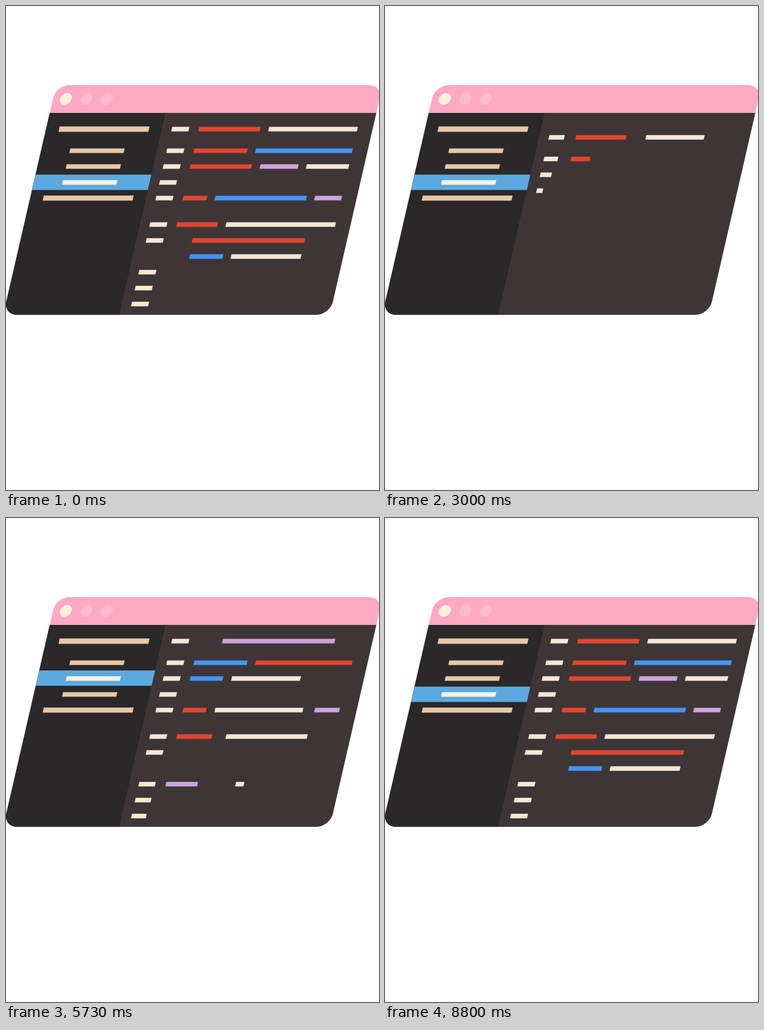
An HTML page with a canvas for the animation above (8870 ms loop, 658 by 851 pixels).

```html
<!DOCTYPE html>
<html lang="en">
<head>
<meta charset="utf-8">
<title>Code editor</title>
<style>
  html, body { margin: 0; width: 100%; height: 100%; overflow: hidden; background: #fff; }
  canvas { display: block; }
</style>
</head>
<body>
<canvas id="stage" width="658" height="851"></canvas>
<script>
const ctx = document.getElementById('stage').getContext('2d');

const LOOP = 8870, FRAME = 1000 / 15;
const FIRST_SWITCH = 118, SWITCH_EVERY = 2197;
const SCROLL_TIME = 1000, SCROLL_DISTANCE = 375;
const GROW_START = 449.5, GROW_STAGGER = 63.5, GROW_TIME = 700;
const MARK_START = 135, MARK_TIME = 500;

// Window geometry before the skew, which is anchored at the bottom edge.
const SKEW = Math.tan(13 * Math.PI / 180);
const LEFT = -5, RIGHT = 571.5, TOP = 139, BODY = 188, BOTTOM = 543, DIVIDER = 199.5;

const PINK = '#ffa9c4', SIDEBAR = '#2a2829', EDITOR = '#3e3636', MARK = '#5ba9e1';
const TAN = '#e6c8a9', BRIGHT = '#fff0e0';
const INK = { w: '#f8e6d8', r: '#e5452f', b: '#4495ff', p: '#cda2db' };

const ROW_Y = [216.5, 254.5, 282.3, 310.2, 337.8, 384.2, 412.2, 440.5, 468, 496, 524];
const NUMBER_ROWS = [0, 1, 2, 3, 4, 5, 6, 8, 9, 10];

// Each bar: row, ink, left, right.
const FILES = [
  [
    [0, 'r', 264.6, 373], [0, 'w', 388, 544.5],
    [1, 'r', 264.6, 359], [1, 'b', 373.4, 544.5],
    [2, 'r', 264.6, 373], [2, 'p', 388, 455.2], [2, 'w', 469.7, 544.5],
    [4, 'r', 264.8, 306.8], [4, 'b', 321.2, 482.7], [4, 'p', 497, 544.6],
    [5, 'r', 264.6, 336.4], [5, 'w', 351.2, 544.6],
    [6, 'r', 298.2, 496.8],
    [7, 'b', 300.3, 358.9], [7, 'w', 373.3, 497]
  ],
  [
    [0, 'p', 306.5, 504.7],
    [1, 'b', 264.8, 359], [1, 'r', 373.4, 544.5],
    [2, 'b', 264.6, 322.6], [2, 'w', 337.7, 460.8],
    [4, 'r', 264.8, 306.8], [4, 'w', 321.2, 482.7], [4, 'p', 497, 544.6],
    [5, 'r', 264.6, 336.4], [5, 'w', 351.2, 544.6],
    [8, 'p', 264.5, 373], [8, 'w', 387.8, 544.5],
    [9, 'r', 264.6, 373], [9, 'b', 387.8, 455.2], [9, 'w', 469.7, 544.5]
  ]
];

const clamp = x => Math.min(1, Math.max(0, x));

function expoOut(x) {
  x = clamp(x);
  return x === 1 ? 1 : 1 - 2 ** (-10 * x);
}

function expoInOut(x) {
  x = clamp(x);
  if (x === 0 || x === 1) return x;
  return x < 0.5 ? 2 ** (20 * x - 10) / 2 : 1 - 2 ** (10 - 20 * x) / 2;
}

function rect(color, left, top, right, bottom) {
  ctx.fillStyle = color;
  ctx.fillRect(left, top, right - left, bottom - top);
}

const bar = (color, left, right, y, height = 8) =>
  rect(color, left, y - height / 2, right, y + height / 2);

function dot(color, x) {
  ctx.fillStyle = color;
  ctx.beginPath();
  ctx.arc(x, 163.5, 10.4, 0, 2 * Math.PI);
  ctx.fill();
}

function drawCode(file, offset, age) {
  const grown = i => expoOut((age - GROW_START - i * GROW_STAGGER) / GROW_TIME);
  const growBar = (row, ink, left, right, i) => {
    const width = (right - left) * grown(i);
    if (width > 0) bar(INK[ink], left, left + width, ROW_Y[row] + offset);
  };
  NUMBER_ROWS.forEach((row, i) => growBar(row, 'w', 217, 247.2, i));
  FILES[file].forEach(([row, ink, left, right], i) => growBar(row, ink, left, right, i + 1));
}

function drawSidebar(file, age) {
  const moved = expoInOut((age - MARK_START) / MARK_TIME);
  const position = file === 1 ? 1 - moved : moved;
  const markTop = 268 + 28.5 * position;
  const selected = position < 0.5 ? 2 : 3;

  rect(SIDEBAR, LEFT, BODY, DIVIDER, BOTTOM);
  rect(MARK, LEFT, markTop, DIVIDER, markTop + 27);
  bar(TAN, 18.3, 176.8, ROW_Y[0], 9.5);
  for (const row of [1, 2, 3]) bar(row === selected ? BRIGHT : TAN, 46, 141.8, ROW_Y[row]);
  bar(TAN, 18.3, 176.8, ROW_Y[4], 9);
}

function draw(time) {
  const step = Math.floor((time - FIRST_SWITCH) / SWITCH_EVERY);
  const age = time - FIRST_SWITCH - step * SWITCH_EVERY;
  const file = Math.abs(step % 2) ? 0 : 1;
  const scroll = SCROLL_DISTANCE * expoInOut(age / SCROLL_TIME);

  ctx.clearRect(0, 0, 658, 851);
  ctx.save();
  ctx.transform(1, 0, -SKEW, 1, BOTTOM * SKEW, 0);
  ctx.beginPath();
  ctx.roundRect(LEFT, TOP, RIGHT - LEFT, BOTTOM - TOP, 24);
  ctx.clip();

  rect(EDITOR, LEFT, BODY, RIGHT, BOTTOM);
  drawCode(1 - file, -scroll, Infinity);
  drawCode(file, SCROLL_DISTANCE - scroll, age);
  drawSidebar(file, age);

  rect(PINK, LEFT, TOP, RIGHT, BODY);
  dot('#fff0dc', 17.9);
  dot('#ffbacd', 54.2);
  dot('#ffbacd', 90);
  ctx.restore();
}

function tick() {
  const time = performance.now() % LOOP;
  draw(Math.floor((time + 5) / FRAME) * FRAME);
  requestAnimationFrame(tick);
}
tick();
</script>
</body>
</html>
```
